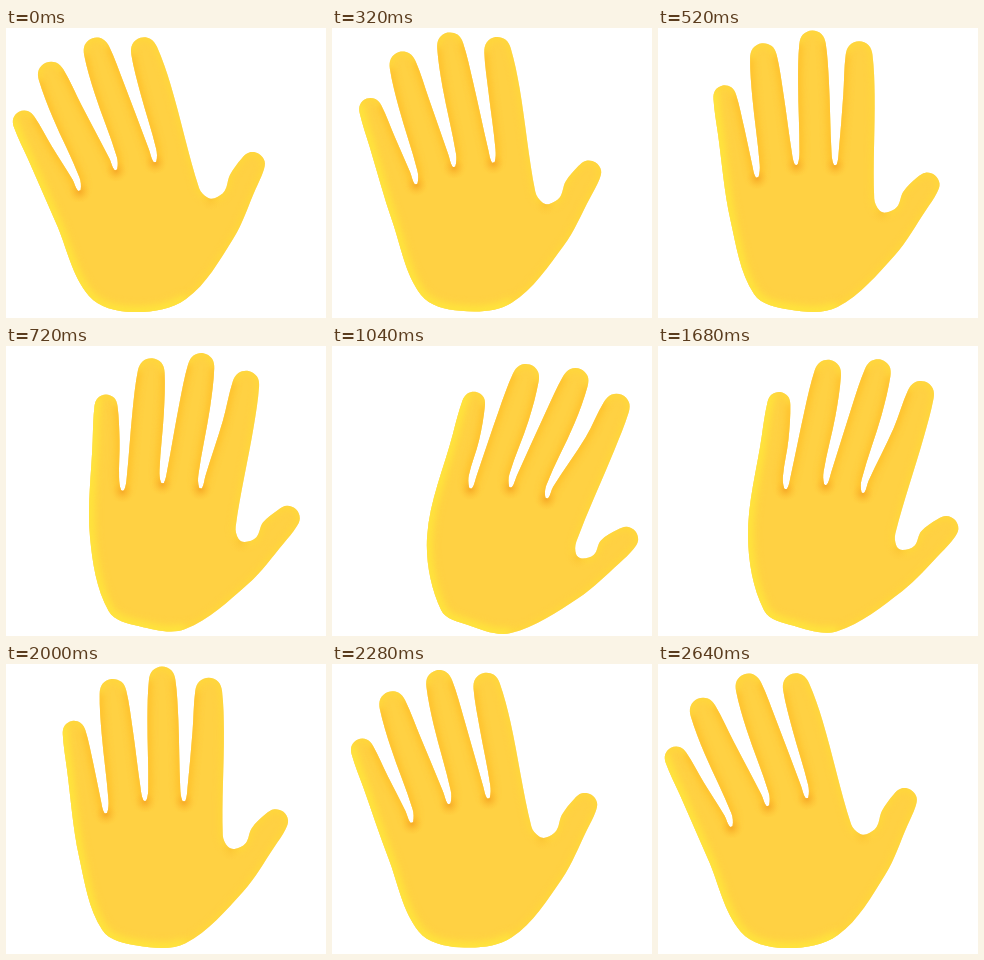
An HTML page with a canvas for the animation above (2.68 s loop, 320 px wide and 290 px high).

```html
<!DOCTYPE html>
<html lang="en">
<head>
<meta charset="utf-8">
<title>Waving hand</title>
<style>
html, body { margin: 0; width: 100%; height: 100%; overflow: hidden; background: #fff; }
canvas { display: block; width: 100vw; height: 100vh; }
</style>
</head>
<body>
<canvas id="stage" width="320" height="290"></canvas>
<script>
const ctx = document.getElementById('stage').getContext('2d');
const LOOP = 2680, STEP = 40;
const PIVOT = [147, 256];

// Joints turn about the wrist: reach, growth, start angle from upright, sweep (degrees).
const FINGERS = [
  { reach: 207, grow: -8, angle: -38.5, sweep: 36.8, r: 11.5 },
  { reach: 232.5, grow: -3, angle: -26, sweep: 37.6, r: 13.4 },
  { reach: 240, grow: 1, angle: -13.6, sweep: 37, r: 13.2 },
  { reach: 233.5, grow: 5, angle: -2.2, sweep: 37.2, r: 13.4 },
  { reach: 155.5, grow: 4, angle: 39.8, sweep: 26.9, r: 12.5 }
];
const GAPS = [
  { reach: 118, grow: -5, angle: -38.5, sweep: 34 },
  { reach: 119, grow: -1, angle: -18.1, sweep: 33.3 },
  { reach: 121, grow: 2, angle: 1, sweep: 32.1 },
  { reach: 102.5, grow: 6, angle: 34.3, sweep: 31.3 }
];
// The lower palm only shifts.
const PALM = {
  base: { from: [180, 271], to: [179, 287] },
  wrist: { from: [126, 284], to: [136, 279] },
  heel: { from: [83, 268], to: [109, 264] },
  side: { from: [50, 195], to: [95, 190] }
};

const add = (p, q, k = 1) => [p[0] + q[0] * k, p[1] + q[1] * k];
const mix = (p, q, k = 0.5) => [p[0] + (q[0] - p[0]) * k, p[1] + (q[1] - p[1]) * k];
const dist = (p, q) => Math.hypot(q[0] - p[0], q[1] - p[1]);
const unit = (p, q) => {
  const len = dist(p, q) || 1;
  return [(q[0] - p[0]) / len, (q[1] - p[1]) / len];
};
const across = v => [-v[1], v[0]];
const ease = x => (1 - Math.cos(Math.PI * Math.min(1, Math.max(0, x)))) / 2;

// 0 is the left end of the wave; the right end lies just past 1.
const swing = t => 1.07 * (ease((t + 20) / 1260) - ease((t - 1305) / 1230));

function turned(joint, w) {
  const a = (joint.angle + joint.sweep * w) * Math.PI / 180;
  return add(PIVOT, [Math.sin(a), -Math.cos(a)], joint.reach + joint.grow * w);
}

// Round tip with a slightly wider belly below it.
function finger(tip, axis, r, length) {
  const n = across(axis), belly = add(tip, axis, -length);
  const a = Math.atan2(axis[1], axis[0]);
  const arc = [-2, -1, 0, 1, 2].map(k => {
    const b = a + k * Math.PI / 4;
    return add(tip, [Math.cos(b), Math.sin(b)], r);
  });
  return [add(belly, n, -1.17 * r), ...arc, add(belly, n, 1.17 * r)];
}

function notch(p, left, right, width, rise) {
  const up = unit([0, 0], add(left, right)), low = add(p, up, 1.5);
  return [
    add(add(p, left, rise), across(left), -width),
    add(low, across(up), -width * 0.45),
    add(low, across(up), width * 0.45),
    add(add(p, right, rise), across(right), width)
  ];
}

function outline(w) {
  const tips = FINGERS.map(f => turned(f, w)), gaps = GAPS.map(g => turned(g, w));
  const shift = w * (1.35 - 0.35 * w);
  const [base, wrist, heel, side] = Object.values(PALM).map(p => mix(p.from, p.to, shift));
  const thumb = tips[4];
  const right = add(mix(thumb, base), across(unit(base, thumb)), 15.5);

  const roots = [side, ...gaps, right];
  const axes = tips.map((tip, i) => unit(mix(roots[i], roots[i + 1]), tip));
  const upright = axes.map(a => mix(a, [0, -1], 0.4));

  const points = [base, wrist, heel, side];
  tips.forEach((tip, i) => {
    const r = FINGERS[i].r;
    points.push(...finger(tip, axes[i], r, r * (i < 4 ? 3 : 1.6)));
    if (i < 3) points.push(...notch(gaps[i], upright[i], upright[i + 1], 3.5, 14));
    if (i === 3) points.push(...notch(gaps[i], axes[i], axes[i + 1], 8, 14));
  });
  points.push(right);
  return { points, gaps };
}

function trace(pts, from, to) {
  const n = pts.length, at = i => pts[(i + n) % n];
  const path = new Path2D();
  path.moveTo(...at(from));
  for (let i = from; i < to; i++) {
    const p = at(i), q = at(i + 1), h = dist(p, q) / 3;
    const c1 = add(p, unit(at(i - 1), q), h), c2 = add(q, unit(p, at(i + 2)), -h);
    path.bezierCurveTo(...c1, ...c2, ...q);
  }
  return path;
}

function soft(path, color, width, blur) {
  ctx.filter = `blur(${blur}px)`;
  ctx.strokeStyle = color;
  ctx.lineWidth = width;
  ctx.stroke(path);
  ctx.filter = 'none';
}

function glow([x, y], r, alpha) {
  const g = ctx.createRadialGradient(x, y, 0, x, y, r);
  g.addColorStop(0, `rgba(240,155,35,${alpha})`);
  g.addColorStop(1, 'rgba(255,185,45,0)');
  ctx.fillStyle = g;
  ctx.fillRect(x - r, y - r, 2 * r, 2 * r);
}

function draw(t) {
  const { points, gaps } = outline(swing(t));
  const hand = trace(points, 0, points.length);
  hand.closePath();
  ctx.fillStyle = '#fff';
  ctx.fillRect(0, 0, 320, 290);
  ctx.fillStyle = '#ffd143';
  ctx.fill(hand);

  ctx.save();
  ctx.clip(hand);
  soft(hand, 'rgba(255,218,56,.7)', 7, 3);
  soft(trace(points, 0, 6), 'rgba(255,232,62,.9)', 10, 4);
  for (let i = 0; i < 3; i++) {
    const start = 9 + 11 * i;
    soft(trace(points, start, start + 7), 'rgba(255,182,40,.65)', 8, 3);
  }
  gaps.forEach((gap, i) => glow(gap, 11, i < 3 ? 0.6 : 0.25));
  ctx.restore();
}

function tick() {
  draw(Math.floor(performance.now() % LOOP / STEP) * STEP);
  requestAnimationFrame(tick);
}
tick();
</script>
</body>
</html>
```
